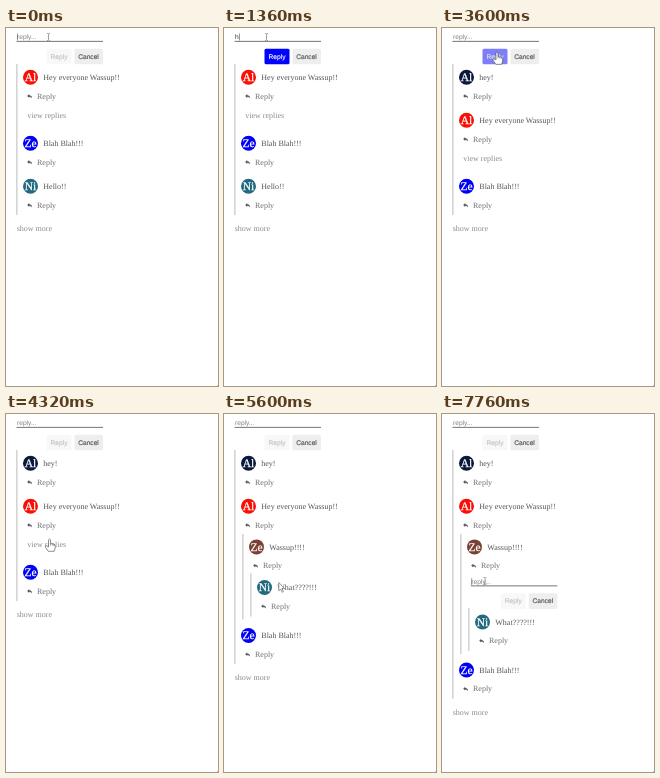
These frames come from a looping animation (212 px wide and 358 px high, 8000 ms). An HTML page:

```html
<!DOCTYPE html>
<html lang="en">
<head>
<meta charset="utf-8">
<title>Nested comments</title>
<style>
  html, body { margin: 0; width: 100%; height: 100%; overflow: hidden; background: #fff; }
  svg { display: block; width: 100vw; height: 100vh; font: 8px "Liberation Serif", serif; text-rendering: geometricPrecision; }
  .ui { font: 6.67px "Liberation Sans", sans-serif; }
</style>
</head>
<body>
<svg id="stage" viewBox="0 0 212 358"></svg>
<script>
const LOOP = 8000;
const TYPED = [[1040, 'h'], [1520, 'he'], [1760, 'hey'], [2160, 'hey!']];
const SENT = 3520, OPEN_FIRST = 4720, OPEN_SECOND = 5600, OPEN_FORM = 7200;
const NEST = 40.6; // distance from a comment to its first reply

// Pointer stops: time, x, y
const PATH = [
  [0, 42.5, 9], [3160, 42.5, 9], [3280, 55, 24], [3760, 55, 24], [4320, 43.5, 125],
  [4720, 43.5, 125], [5280, 54, 166], [5440, 54.5, 168], [6200, 54.5, 168],
  [6720, 46, 161], [6960, 45, 150], [7280, 45, 150], [7600, 43, 167], [LOOP, 43, 167]
];
// Pointer shape from each time on
const SHAPES = [
  [0, 'beam'], [3240, 'hand'], [3840, 'arrow'], [4240, 'hand'], [4800, 'arrow'],
  [5200, 'hand'], [5600, 'arrow'], [6800, 'hand'], [7440, 'beam']
];
const POINTERS = {
  beam: '<path d="M-1.5-3.5H-.3M.3-3.5H1.5M0-3.2V3.2M-1.5 3.5H-.3M.3 3.5H1.5" fill="none" stroke="#666" stroke-width=".6"/>',
  arrow: '<path d="M.3.5V8.8L2.2 7.1L3.6 10.3L4.9 9.7L3.5 6.6H6.1Z" fill="#fff" stroke="#555" stroke-width=".6"/>',
  hand: '<path d="M-1 .8Q0-.8 1 .8V4.5Q2.2 3.8 2.7 5Q4 4.4 4.3 5.5Q5.7 5.2 5.7 6.6V9L4.6 12.3H-1.2L-4 8.2Q-4.6 6.5-3 6.7L-1 8Z" fill="#fff" stroke="#444" stroke-width=".6"/>' +
        '<path d="M1 4.5V6.5M2.7 5V6.7M4.3 5.5V7" stroke="#444" stroke-width=".5"/>'
};

const clamp = v => Math.max(0, Math.min(1, v));
const ease = v => v * v * (3 - 2 * v);
const latest = (list, t, none) => list.reduce((value, [time, next]) => t >= time ? next : value, none);
const text = (x, y, value, fill, extra = '') => `<text x="${x}" y="${y}" fill="${fill}" ${extra}>${value}</text>`;
const rect = (x, y, w, h, fill, extra = '') =>
  `<rect x="${x}" y="${y}" width="${w}" height="${h}" fill="${fill}" ${extra}/>`;
const rule = (x, top, bottom) => rect(x, top, .8, bottom - top, '#aaa');
const mix = (a, b, k) => `rgb(${a.map((v, i) => Math.round(v + (b[i] - v) * k))})`;

function form(x, y, value, caret, active) {
  const caretX = x + .8 + [...value].reduce((w, c) => w + { h: 3.7, e: 3.7, y: 3.3, '!': 1.9 }[c], 0);
  const label = 'class="ui" text-anchor="middle" stroke-width=".15" ';
  const labelColor = mix([195, 195, 195], [255, 255, 255], active);
  return text(x + .5, y + 2.2, value || 'reply...', value ? '#333' : '#808080', 'class="ui"') +
    (caret ? rect(caretX, y - 3.5, .5, 7, '#333') : '') +
    rect(x, y + 3.9, 86.5, .8, '#555') +
    rect(x + 30, y + 11.7, 25, 15.6, mix([248, 248, 248], [0, 0, 255], active), 'rx="1.5"') +
    text(x + 42.5, y + 21.7, 'Reply', labelColor, `${label} stroke="${labelColor}"`) +
    rect(x + 58, y + 11.7, 28.5, 15.6, '#eee', 'rx="1.5"') +
    text(x + 72, y + 21.7, 'Cancel', '#555', `${label} stroke="#555"`);
}

function comment(depth, y, initials, color, message, more) {
  const x = depth * 8;
  return `<circle cx="${x + 24.5}" cy="${y}" r="7.5" fill="${color}"/>` +
    text(x + 24.5, y + 3.8, initials, '#fff', 'font-size="11.5" text-anchor="middle" stroke="#fff" stroke-width=".25"') +
    text(x + 37.3, y + 2.9, message, '#555') +
    `<path transform="translate(${x + 21.2} ${y + 16.8})" d="M0 1.9L2 0V1.1Q4.8 1.1 4.8 4.1Q4 2.6 2 2.6V3.8Z" fill="#555"/>` +
    text(x + 31, y + 21.4, 'Reply', '#707070') +
    (more ? text(x + 21.3, y + 40.4, 'view replies', '#8c8c8c') : '');
}

function thread(t) {
  const sent = t >= SENT, first = t >= OPEN_FIRST, second = t >= OPEN_SECOND, replying = t >= OPEN_FORM;
  let y = 49.3, out = '';
  if (sent) {
    out += comment(0, y, 'Al', '#0b1a3c', 'hey!');
    y += 43;
  }
  out += comment(0, y, 'Al', '#f90f05', 'Hey everyone Wassup!!', !first);
  y += first ? NEST : 66;
  if (first) {
    const top = y - 13;
    out += comment(1, y, 'Ze', '#7b4034', 'Wassup!!!!', !second);
    if (replying) {
      out += form(28.8, y + 34.7, '', t >= 7760, 0);
      y += 34.5;
    }
    if (second) {
      y += NEST;
      out += comment(2, y, 'Ni', '#226a7e', 'What????!!!') + rule(26.5, y - 14, y + 29);
      y += 45.5;
    } else y += 66;
    y += 2.5;
    out += rule(18.5, top, y - 16);
  }
  out += comment(0, y, 'Ze', '#0000f5', 'Blah Blah!!!');
  if (!sent) {
    y += 43;
    out += comment(0, y, 'Ni', '#226a7e', 'Hello!!');
  }
  return out + rule(10.5, 36, y + 28.7) + text(10.7, y + 44.5, 'show more', '#8c8c8c');
}

function pointer(t) {
  const i = PATH.findIndex(([time]) => time > t);
  const [t0, x0, y0] = PATH[i - 1], [t1, x1, y1] = PATH[i];
  const k = ease((t - t0) / (t1 - t0));
  return `<g transform="translate(${x0 + (x1 - x0) * k} ${y0 + (y1 - y0) * k})">${POINTERS[latest(SHAPES, t)]}</g>`;
}

function render(t) {
  const value = t < SENT ? latest(TYPED, t, '') : '';
  const caret = t < SENT && !(t >= 400 && t < 900) && !(t >= 2640 && t < 3200);
  const active = clamp((t - 1040) / 240) * (1 - clamp((t - SENT) / 160));
  return form(10.5, 9, value, caret, active) + thread(t) + rect(211, 357, 1, 1, '#bbb') + pointer(t);
}

const stage = document.getElementById('stage');
function tick() {
  stage.innerHTML = render(performance.now() % LOOP);
  requestAnimationFrame(tick);
}
tick();
</script>
</body>
</html>
```
